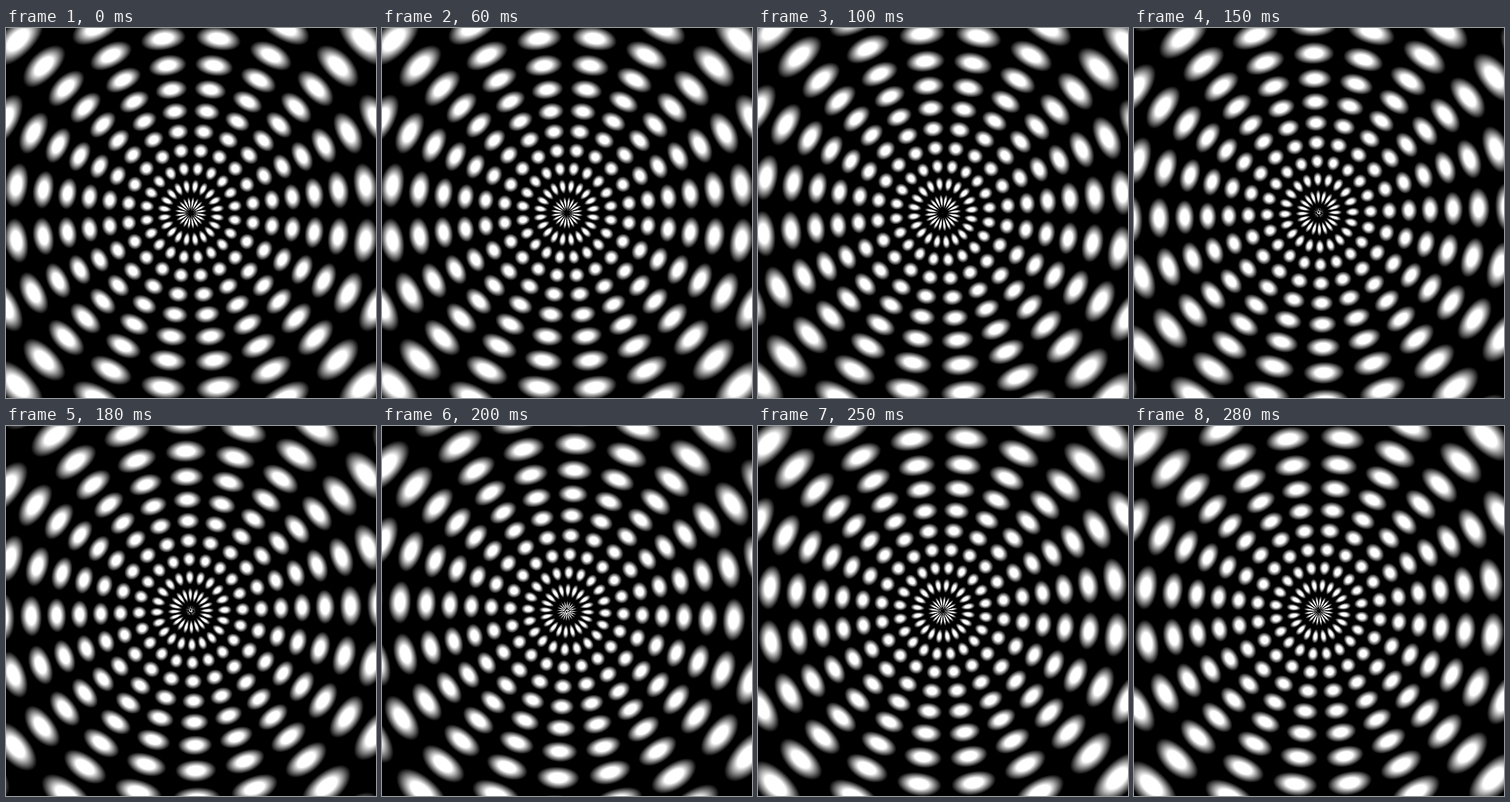
Recreate the animation shown at these times as an HTML page with a canvas. Size 498x498 px, loop 0.3 s.

```html
<!DOCTYPE html>
<html lang="en">
<head>
<meta charset="utf-8">
<title>Dot tunnel</title>
<style>
  html, body { margin: 0; width: 100%; height: 100%; overflow: hidden; background: #000; }
  canvas { display: block; }
</style>
</head>
<body>
<canvas id="stage" width="498" height="498"></canvas>
<script>
const SIZE = 498, CX = 248.3, CY = 248.5;
const DOTS_PER_RING = 20;
const LENS = 287, RING_STEP = 0.0811;   // ring radius = LENS * tan(RING_STEP * n)
const RING_SHIFT = 0.028;
const INNER = 0.17, OUTER = 0.41;       // soft dot edge, in cells
const STEP_MS = 50, LOOP_MS = 300;

const ctx = document.getElementById('stage').getContext('2d');

// Signed distance from the middle of the unit cell containing x
const fromCellCentre = x => x - Math.floor(x) - 0.5;

// Phase 0..1 moves every dot one ring outward and one place clockwise
function renderTunnel(phase) {
  const image = ctx.createImageData(SIZE, SIZE);
  const pixels = new Uint32Array(image.data.buffer);
  for (let y = 0, i = 0; y < SIZE; y++) {
    for (let x = 0; x < SIZE; x++, i++) {
      const dx = x - CX, dy = y - CY;
      const turn = Math.atan2(dy, dx) / (2 * Math.PI) * DOTS_PER_RING;
      const ring = Math.atan(Math.hypot(dx, dy) / LENS) / RING_STEP - RING_SHIFT;
      const d = Math.hypot(fromCellCentre(turn - phase), fromCellCentre(ring - phase));
      const light = Math.min(1, Math.max(0, (OUTER - d) / (OUTER - INNER)));
      pixels[i] = 0xff000000 | Math.round(255 * light) * 0x010101;
    }
  }
  return image;
}

// One held pose at rest, then four evenly spaced jumps
const poses = [0, 2, 6, 10, 14].map(n => renderTunnel(n / 15));

function draw() {
  const step = Math.floor(performance.now() % LOOP_MS / STEP_MS);
  ctx.putImageData(poses[Math.max(0, step - 1)], 0, 0);
  requestAnimationFrame(draw);
}
draw();
</script>
</body>
</html>
```
